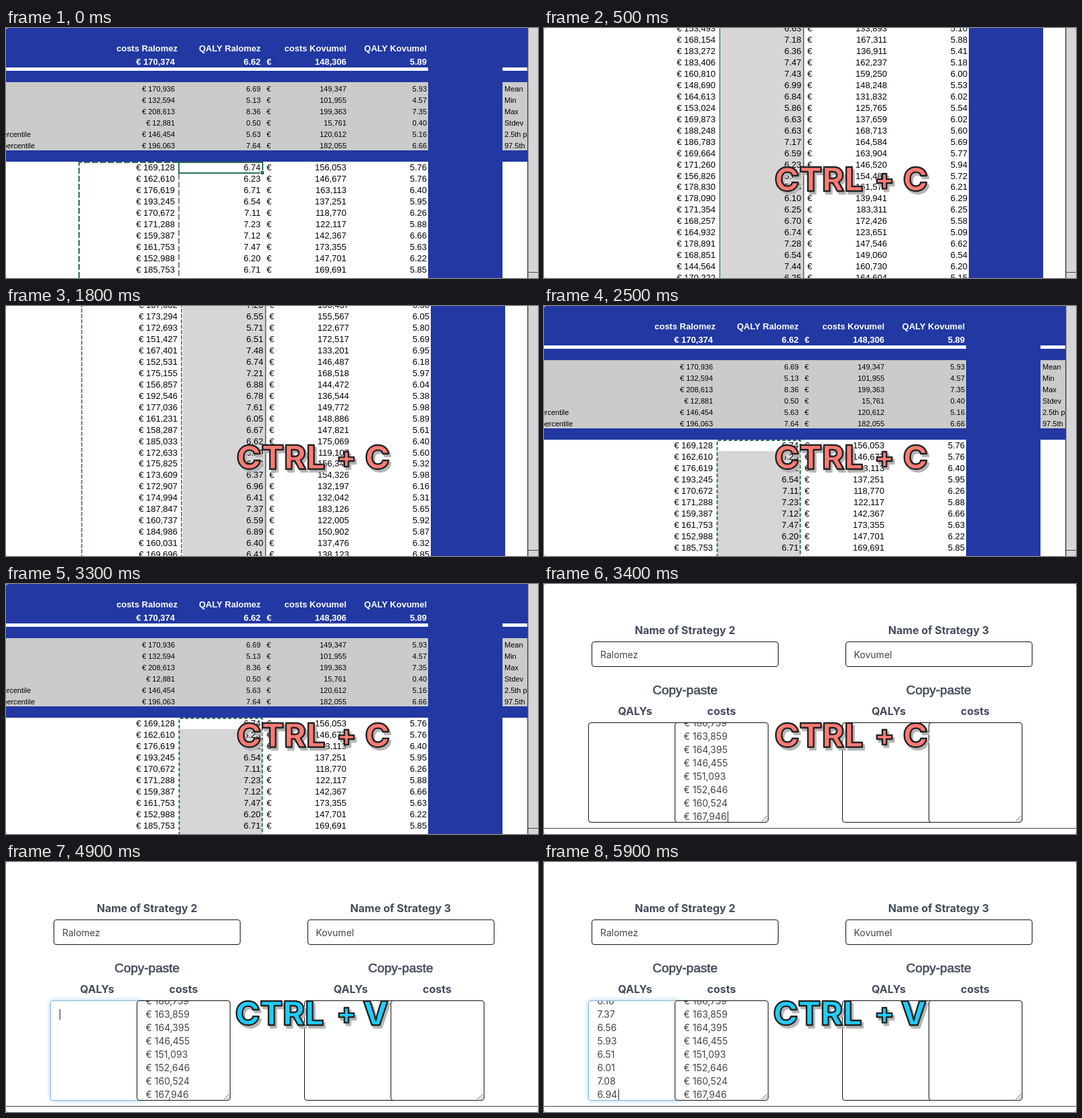
An HTML page with a canvas for the animation above (6000 ms loop, 794x374 px).

```html
<!DOCTYPE html>
<html lang="en">
<head>
<meta charset="utf-8">
<title>Copying results into a form</title>
<style>
html, body { margin: 0; width: 100%; height: 100%; overflow: hidden; background: #fff; }
canvas { display: block; width: 794px; height: 374px; }
</style>
</head>
<body>
<canvas id="stage" width="794" height="374"></canvas>
<script>
const W = 794, H = 374, LOOP = 6000, STEP = 100;
const ctx = document.getElementById('stage').getContext('2d');
const ARIAL = '"Liberation Sans", Arial, sans-serif';
const INTER = 'Inter, sans-serif';
const BLUE = '#2238a2', GREY = '#cbcbcb', PICKED = '#d6d6d6', INK = '#000';
const GREEN = '#2f7055', ANT = '#456c5f';
const SLATE = '#434b5b', BODY = '#444';
const DRUGS = ['Ralomez', 'Kovumel'];
const PITCH = 16.94;

const MEANS = ['170,374', '6.62', '148,306', '5.89'];
const SUMMARY = [
  ['Mean', '170,936', '6.69', '149,347', '5.93'],
  ['Min', '132,594', '5.13', '101,955', '4.57'],
  ['Max', '208,613', '8.36', '199,363', '7.35'],
  ['Stdev', '12,881', '0.50', '15,761', '0.40'],
  ['2.5th percentile', '146,454', '5.63', '120,612', '5.16'],
  ['97.5th percentile', '196,063', '7.64', '182,055', '6.66']];
const COSTS = '186,759 163,859 164,395 146,455 151,093 152,646 160,524 167,946'
  .split(' ').map(v => '€ ' + v);
const QALYS = '6.16 7.37 6.56 5.93 6.51 6.01 7.08 6.94'.split(' ');

function rng(seed) {
  let s = seed * 7919 + 17;
  return () => (s = (s * 16807) % 2147483647) / 2147483647;
}

// Simulated rows follow the mean and spread given in the summary
function simulate(seed, count) {
  const next = rng(seed);
  const number = str => Number(str.replace(',', ''));
  const [mean, , , spread] = SUMMARY.map(([, ...values]) => values.map(number));
  const sample = col => mean[col] + spread[col] * 2 * (next() + next() + next() - 1.5);
  return Array.from({ length: count }, () => mean.map((m, col) =>
    m > 100 ? Math.round(sample(col)).toLocaleString('en-US') : sample(col).toFixed(2)));
}

function rect(x, y, w, h, color) {
  ctx.fillStyle = color;
  ctx.fillRect(x, y, w, h);
}

// y is the middle of the capitals
function text(str, x, y, size, { align = 'left', family = ARIAL, weight = 400, color = INK } = {}) {
  ctx.font = `${weight} ${size}px ${family}`;
  ctx.textAlign = align;
  ctx.fillStyle = color;
  ctx.fillText(str, x, y + size * 0.36);
}

function path(points, color, width, dash = [], offset = 0) {
  ctx.save();
  ctx.strokeStyle = color;
  ctx.lineWidth = width;
  ctx.setLineDash(dash);
  ctx.lineDashOffset = offset;
  ctx.beginPath();
  points.forEach(([x, y]) => ctx.lineTo(x, y));
  ctx.stroke();
  ctx.restore();
}

function sheetRow(row, y, dx, size, style = {}) {
  const right = { align: 'right', ...style };
  text('€ ' + row[0], 252 + dx, y, size, right);
  text(row[1], 380 + dx, y, size, right);
  text('€', 389 + dx, y, size, style);
  text(row[2], 508 + dx, y, size, right);
  text(row[3], 628 + dx, y, size, right);
}

function scrollBar() {
  rect(778, 0, 16, H, '#d6d6d6');
  rect(778, 0, 1.5, H, '#444');
  rect(779, 365, 15, 1, '#444');
}

function sheetTop(n) {
  const copied = n >= 20;
  rect(0, 0, 778, 200, BLUE);
  rect(630, 0, 111, H, BLUE);
  for (const [x, w] of [[0, 630], [741, 37]]) {
    rect(x, 59, w, 5, '#fff');
    rect(x, 81, w, 102, GREY);
  }
  const bold = { weight: 700, color: '#fff' };
  DRUGS.forEach((drug, i) => {
    text('costs ' + drug, 256 + i * 252, 30, 13, { ...bold, align: 'right' });
    text('QALY ' + drug, 380 + i * 248, 30, 13, { ...bold, align: 'right' });
  });
  sheetRow(MEANS, 50, 0, 13, bold);
  SUMMARY.forEach(([label, ...values], i) => {
    const y = 91.3 + i * 17;
    sheetRow(values, y, 0, 11);
    text(label, 744, y, 11);
    if (i > 3) text(label, 13 + i * 6, y, 11, { align: 'right' });
  });

  if (copied) rect(258, 217, 125, H - 217, PICKED);
  simulate(1, 11).forEach((row, i) => sheetRow(row, 208.8 + i * PITCH, 0, 13));
  if (copied) {
    path([[258.5, H], [258.5, 201], [382.5, 201], [382.5, H]], GREEN, 2, [5, 3], n * 2);
  } else {
    path([[109, H], [109, 201], [258, 201]], GREEN, 2, [9, 3], n * 2);
    path([[258, 218], [258, H]], ANT, 1.5, [9, 3], -n * 2);
    ctx.strokeStyle = GREEN;
    ctx.lineWidth = 2;
    ctx.strokeRect(258, 201, 125, 16);
    rect(379, 213, 7, 7, '#fff');
    rect(380, 214, 5, 5, GREEN);
  }
  scrollBar();
}

function sheetScrolled(n) {
  const ants = n >= 8;
  rect(634, 0, 111, H, BLUE);
  rect(264, 0, 123, H, PICKED);
  const top = ants ? -1.4 : 0.6;
  simulate(n, 23).forEach((row, i) => sheetRow(row, top + i * PITCH, 4, 13));
  path([[387.5, 0], [387.5, H]], GREEN, 1.5);
  if (ants) {
    path([[113, 0], [113, H]], ANT, 1.6, [6, 2], n * 2);
    path([[262, 0], [262, H]], ANT, 1.6, [6, 2], -n * 2);
  } else {
    path([[262.5, 0], [262.5, H]], GREEN, 1.5);
  }
  scrollBar();
}

function box(x, y, w, h, glow) {
  ctx.save();
  ctx.beginPath();
  ctx.roundRect(x + 0.5, y + 0.5, w - 1, h - 1, 3.5);
  if (glow) {
    ctx.shadowColor = '#8cc4f2';
    ctx.shadowBlur = 7;
  }
  ctx.fillStyle = '#fff';
  ctx.fill();
  ctx.shadowBlur = 0;
  ctx.strokeStyle = glow ? '#86b7dc' : '#111';
  ctx.lineWidth = 1;
  ctx.stroke();
  ctx.restore();
}

function area(x, lines, { glow = false, caret = false } = {}) {
  box(x, 207, 140, 150, glow);
  ctx.save();
  ctx.beginPath();
  ctx.rect(x + 1, 208, 138, 148);
  ctx.clip();
  lines.forEach((line, i) => text(line, x + 13.5, 208 + i * 20, 14, { family: INTER, color: BODY }));
  if (caret) {
    const last = lines.length ? lines[lines.length - 1] : '';
    const cx = Math.round(x + 15 + (last ? ctx.measureText(last).width : -1));
    rect(cx, last ? 340 : 220, 1, 16, '#222');
  }
  ctx.restore();
  path([[x + 130, 355], [x + 138, 347]], '#666', 1);
  path([[x + 134.5, 355], [x + 138, 351.5]], '#666', 1);
}

function form(n) {
  const inQalys = n >= 48, pasted = n >= 54;
  const head = { family: INTER, weight: 700, align: 'center', color: SLATE };
  const costs = { glow: n >= 35 && !inQalys, caret: !inQalys && (n < 39 || n >= 44) };
  const qalys = { glow: inQalys, caret: inQalys && n !== 53 };
  DRUGS.forEach((drug, i) => {
    const dx = i * 378.5, col = Math.round(dx);
    text('Name of Strategy ' + (i + 2), 210.5 + dx, 69, 16, head);
    box(71 + col, 86, 279, 38);
    text(drug, 84 + dx, 105.5, 14, { family: INTER, color: BODY });
    text('Copy-paste', 210.5 + dx, 158.5, 19, { align: 'center', color: SLATE });
    ctx.strokeStyle = SLATE;
    ctx.lineWidth = 0.6;
    ctx.strokeText('Copy-paste', 210.5 + dx, 158.5 + 19 * 0.36);
    text('QALYs', 136 + dx, 190, 16, head);
    text('costs', 265 + dx, 190, 16, head);
    area(66 + col, !i && pasted ? QALYS : [], i ? {} : qalys);
    area(195 + col, i ? [] : COSTS, i ? {} : costs);
  });
  rect(0, 365, W, 1, '#444');
}

function shortcut(key, color, left, right) {
  const parts = [['CTRL', left, 'left', 50], ['+', 508, 'center', 44], [key, right, 'right', 50]];
  const each = paint => parts.forEach(([str, x, align, size]) => {
    ctx.font = `800 ${size}px ${INTER}`;
    ctx.textAlign = align;
    paint(str, x, str === '+' ? 242 : 244);
  });
  ctx.save();
  ctx.lineJoin = 'round';
  ctx.lineWidth = 2.4;
  ctx.fillStyle = ctx.strokeStyle = '#b5b5b5';
  each((str, x, y) => {
    ctx.fillText(str, x + 3, y + 4);
    ctx.strokeText(str, x + 3, y + 4);
  });
  ctx.fillStyle = color;
  ctx.strokeStyle = '#222';
  each((str, x, y) => {
    ctx.fillText(str, x, y);
    ctx.strokeText(str, x, y);
  });
  ctx.restore();
}

function corners() {
  ctx.fillStyle = '#c4c4c4';
  ctx.beginPath();
  ctx.rect(0, 0, W, H);
  ctx.roundRect(0, 0, W, H, 4);
  ctx.fill('evenodd');
}

function draw(now) {
  const n = Math.floor((now % LOOP) / STEP);
  rect(0, 0, W, H, '#fff');
  if (n >= 34) form(n);
  else if (n >= 2 && n < 20) sheetScrolled(n);
  else sheetTop(n);
  if (n >= 3 && n < 44) shortcut('C', '#ff7b74', 344, 573);
  if (n >= 48) shortcut('V', '#1fcdfa', 342, 571);
  corners();
}

let start = null;
function tick(now) {
  if (start === null) start = now;
  draw(now - start);
  requestAnimationFrame(tick);
}
draw(0);
requestAnimationFrame(tick);
</script>
</body>
</html>
```
